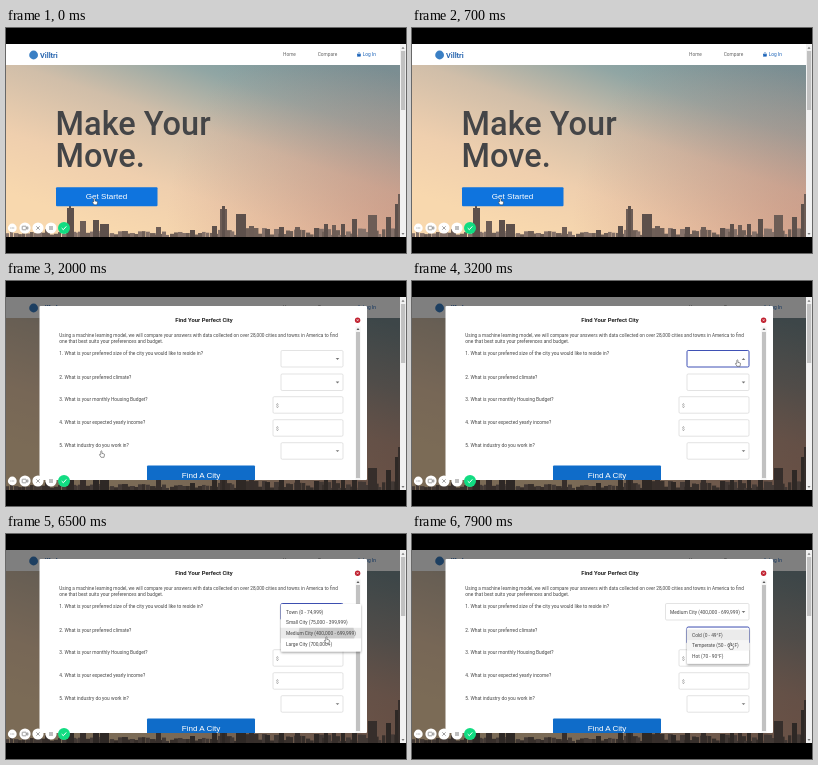
Write an HTML page that moves like this. It is 400 px wide and 225 px high and loops after 8000 ms.

```html
<!DOCTYPE html>
<html lang="en">
<head>
<meta charset="utf-8">
<title>Find Your Perfect City</title>
<style>
  html, body { margin: 0; width: 100%; height: 100%; overflow: hidden; background: #000; }
  svg { display: block; width: 100%; height: 100%; }
  text { font-family: Roboto, "Open Sans", sans-serif; font-size: 4.85px; fill: #444; white-space: pre; }
  .nav { font-size: 4.8px; fill: #666; }
  .hero { font-size: 32.5px; font-weight: 500; fill: #444547; }
  .btn { font-family: "Liberation Sans", Arial, sans-serif; font-size: 8.1px; fill: #fff; text-anchor: middle; }
  .title { font-size: 5.85px; font-weight: 700; fill: #222; text-anchor: middle; }
  .lead { font-size: 4.73px; }
  .dollar { fill: #777; }
  .field { fill: #fff; stroke: #d0d0d0; stroke-width: .6; }
  .field.hover { stroke: #444; }
  .field.focus { stroke: #3f51b5; stroke-width: 1; }
  .menu > .paper { fill: #fff; filter: url(#shadow); }
</style>
</head>
<body>
<svg viewBox="0 0 400 225" preserveAspectRatio="none">
  <defs>
    <linearGradient id="sky" gradientUnits="userSpaceOnUse" x1="260" y1="1" x2="183" y2="227">
      <stop offset="0" stop-color="#6a919a"/>
      <stop offset=".25" stop-color="#91a6a4"/>
      <stop offset=".48" stop-color="#d0bea9"/>
      <stop offset=".76" stop-color="#efcfae"/>
      <stop offset="1" stop-color="#f8d8ae"/>
    </linearGradient>
    <radialGradient id="dusk" gradientUnits="userSpaceOnUse" cx="400" cy="200" r="240">
      <stop offset="0" stop-color="#c4806f" stop-opacity=".55"/>
      <stop offset="1" stop-color="#c4806f" stop-opacity="0"/>
    </radialGradient>
    <filter id="shadow" x="-20%" y="-20%" width="140%" height="150%">
      <feDropShadow dx="0" dy="1.2" stdDeviation="1.3" flood-color="#000" flood-opacity=".4"/>
    </filter>
    <clipPath id="view"><rect y="16" width="400" height="193"/></clipPath>
    <clipPath id="card"><rect x="33.5" y="25" width="327.5" height="174" rx="1"/></clipPath>
    <clipPath id="rowClip"><rect x="275" y="93.8" width="80" height="10.6"/></clipPath>
  </defs>

  <rect width="400" height="225"/>
  <g clip-path="url(#view)">
    <rect y="37" width="400" height="172" fill="url(#sky)"/>
    <rect y="37" width="400" height="172" fill="url(#dusk)"/>
    <g id="city"></g>
    <rect y="16" width="400" height="21" fill="#fff"/>
    <circle cx="27.6" cy="27" r="4.4" fill="#3a7fc4"/>
    <text x="34" y="29.8" style="font-size:7.3px;font-weight:700;fill:#2866b0">Villtri</text>
    <text class="nav" x="277" y="28.3">Home</text>
    <text class="nav" x="311.7" y="28.3">Compare</text>
    <g stroke="#1a62b8" fill="none" stroke-width=".6">
      <path d="M352 26.4v-.8a1 1 0 0 1 2 0v.8"/>
      <rect x="351.6" y="26.4" width="2.8" height="1.8" fill="#1a62b8"/>
    </g>
    <text class="nav" x="356.7" y="28.3" style="fill:#1a62b8">Log In</text>
    <text class="hero" x="49.6" y="107">Make Your</text>
    <text class="hero" x="49.6" y="139">Move.</text>
    <rect x="50" y="159.3" width="101.5" height="19" rx="1" fill="#0f74de"/>
    <text class="btn" x="100.5" y="171.4">Get Started</text>

    <g id="dialog">
      <rect y="16" width="400" height="193" fill="#000" opacity=".5"/>
      <g clip-path="url(#card)">
        <rect x="33" y="25" width="329" height="174" fill="#fff"/>
        <text class="title" x="198" y="41.1">Find Your Perfect City</text>
        <circle cx="351.6" cy="39.2" r="2.7" fill="#c01f2e"/>
        <path d="M350.6 38.2l2 2m0-2l-2 2" stroke="#fff" stroke-width=".6"/>
        <rect x="349.5" y="45.5" width="5" height="154" fill="#f4f4f4"/>
        <rect x="350" y="51" width="4" height="146" fill="#c1c1c1"/>
        <path d="M350.5 49l1.5-2 1.5 2z" fill="#555"/>
        <text class="lead" x="53.3" y="56.2">Using a machine learning model, we will compare your answers with data collected on over 28,000 cities and towns in America to find</text>
        <text x="53.3" y="62.3">one that best suits your preferences and budget.</text>
        <g id="form"></g>
        <rect x="141" y="184.6" width="108" height="20" rx="1" fill="#0f6cc9"/>
        <text class="btn" x="195" y="197">Find A City</text>
      </g>
      <g id="menus"></g>
    </g>

    <rect x="394" y="16" width="6" height="193" fill="#f1f1f1"/>
    <rect x="395" y="23" width="4.2" height="59" fill="#c1c1c1"/>
    <path d="M395.5 20.8l1.5-2 1.5 2zM395.5 205l1.5 2 1.5-2z" fill="#777"/>

    <g id="tools">
      <circle cx="6.3" cy="200" r="4.4" fill="#fff"/>
      <circle cx="19" cy="200" r="5.6" fill="#fff"/>
      <circle cx="32" cy="200" r="5.6" fill="#fff"/>
      <circle cx="45" cy="200" r="5.6" fill="#fff"/>
      <circle cx="58" cy="200" r="6" fill="#12dc82"/>
      <g fill="none" stroke="#8a8a8a" stroke-width=".8">
        <path d="M4.4 200h3.8" stroke-dasharray=".9 .55"/>
        <rect x="16.2" y="198.2" width="4" height="3.6" rx=".5"/>
        <path d="M20.2 200l1.7-1.2v2.4zM30.3 198.3l3.4 3.4m0-3.4l-3.4 3.4"/>
        <path d="M44 198v4m2-4v4" stroke-width="1.1"/>
        <path d="M55.7 200.1l1.6 1.6 3-3.3" stroke="#fff" stroke-width="1"/>
      </g>
    </g>
    <path id="hand" d="M-1.2 .4V-2.7q.6-.9 1.2 0V-.6l2 .5q.7.2.5 1L2 3.3H-1L-2.5.9q-.1-.9.6-.6z"
      fill="#fff" stroke="#333" stroke-width=".5" stroke-linejoin="round"/>
  </g>
</svg>

<script>
const LOOP = 8000, STEP = 100, ROW = 10.6;
const NS = "http://www.w3.org/2000/svg";
const $ = id => document.getElementById(id);

function add(parent, tag, attrs, text) {
  const el = document.createElementNS(NS, tag);
  for (const k in attrs) el.setAttribute(k, attrs[k]);
  if (text) el.textContent = text;
  return parent.appendChild(el);
}

// Skyline: low seeded blocks, then the towers as [x, width, top].
let seed = 11;
const rand = () => (seed = seed * 16807 % 2147483647) / 2147483647;
const block = (x, w, top, fill) => add($("city"), "rect", { x, y: top, width: w, height: 210 - top, fill });
for (let x = 0; x < 400; x += 4) {
  block(x, 3 + rand() * 3, 207 - rand() * (x < 205 ? 4 : 7), rand() > .5 ? "#6f5f57" : "#85726a");
}
[[39, 5, 201], [61, 7, 180], [63, 2, 177], [74, 6, 193], [87, 6, 192], [94, 9, 196], [150, 5, 199],
 [184, 5, 202], [206, 5, 198], [214, 7, 181], [216, 3, 178], [230, 10, 186], [243, 5, 198], [259, 5, 201],
 [273, 5, 199], [289, 5, 199], [308, 5, 200], [318, 4, 196], [326, 4, 197], [335, 4, 196], [346, 5, 191],
 [362, 9, 187], [380, 5, 189], [389, 5, 176], [392, 2, 166]
].forEach(([x, w, top], i) => block(x, w, top, i % 3 ? "#5d504b" : "#6d5d56"));

// Form rows: [question, field left, field top, currency?]
const fields = [
  ["1. What is your preferred size of the city you would like to reside in?", 275, 69.5],
  ["2. What is your preferred climate?", 275, 93],
  ["3. What is your monthly Housing Budget?", 267, 115.7, true],
  ["4. What is your expected yearly income?", 267, 138.7, true],
  ["5. What industry do you work in?", 275, 161.7]
].map(([label, x, y, money]) => {
  add($("form"), "text", { x: 53.3, y: y + 4.7 }, label);
  const box = add($("form"), "rect", { class: "field", x, y, width: 337 - x, height: 16.5, rx: 1.2 });
  if (money) add($("form"), "text", { class: "dollar", x: 270, y: y + 10 }, "$");
  const arrow = money ? null : add($("form"), "path",
    { d: "M-1.8 -.9h3.6l-1.8 1.8z", fill: "#757575", transform: `translate(331.5 ${y + 8.5})` });
  return { box, arrow, x, y };
});
const choice = add($("form"), "text", { x: 258, y: 79.7 }, "Medium City (400,000 - 699,999)");

function makeMenu(top, first, width, items) {
  const g = add($("menus"), "g", { class: "menu" });
  add(g, "rect", { class: "paper", x: 275, y: top, width, height: first - top + items.length * ROW + 2.5, rx: 1 });
  const rows = items.map((_, i) => add(g, "rect", { x: 275, y: first + i * ROW, width, height: ROW }));
  const ripple = add(g, "circle", { cx: 320.5, cy: 101, r: 0, opacity: .14, "clip-path": "url(#rowClip)" });
  items.forEach((s, i) => add(g, "text", { x: 280, y: first + i * ROW + 7.1 }, s));
  return { g, rows, ripple, top, first };
}
const sizes = makeMenu(70, 72.6, 80,
  ["Town (0 - 74,999)", "Small City (75,000 - 399,999)", "Medium City (400,000 - 699,999)", "Large City (700,000+)"]);
const climates = makeMenu(94, 95.5, 62, ["Cold (0 - 49°F)", "Temperate (50 - 69°F)", "Hot (70 - 90°F)"]);

// Pointer path: [ms, x, y]
const path = [
  [0, 89, 173.5], [900, 89, 173.5], [1800, 96, 173], [2100, 96, 173], [2300, 300, 125], [2400, 300, 125],
  [2800, 326, 82], [4700, 326, 82], [4800, 326, 82], [5000, 329, 102], [5100, 329, 102], [5200, 336, 103],
  [5700, 336, 103], [5900, 321, 106], [6900, 321, 106], [7200, 320, 103], [7700, 320, 103],
  [7900, 319, 112], [LOOP, 319, 112]
];
const ramp = (t, from, to) => Math.min(1, Math.max(0, (t - from) / (to - from)));

function pointAt(t) {
  const i = path.findIndex(p => p[0] > t);
  const [a, b] = [path[i - 1], path[i]];
  const k = ramp(t, a[0], b[0]);
  return [a[1] + (b[1] - a[1]) * k, a[2] + (b[2] - a[2]) * k];
}

function showMenu(menu, open, fade, tipY, focused) {
  const { g, rows, top, first } = menu;
  const s = .75 + .25 * open;
  g.setAttribute("opacity", open * fade);
  g.setAttribute("transform", `translate(${306 * (1 - s)} ${top * (1 - s * s)}) scale(${s} ${s * s})`);
  const hover = Math.floor((tipY - first) / ROW);
  rows.forEach((r, i) => r.setAttribute("opacity", i === focused ? .08 : i === hover ? .04 : 0));
}

function draw(t) {
  const [x, y] = pointAt(t);
  const tipY = y - 3;
  const picked = t >= 6700;
  const focused = t >= 7400 ? 1 : t >= 3100 && t < 7200 ? 0 : -1;
  const menuUp = (t >= 3500 && t < 6900) || t >= 7400;
  $("hand").setAttribute("transform", `translate(${x} ${y})`);
  $("dialog").setAttribute("visibility", t < 800 ? "hidden" : "visible");

  fields.forEach((f, i) => {
    const over = !menuUp && x > f.x && x < 337 && tipY > f.y && tipY < f.y + 16.5;
    f.box.setAttribute("class", "field" + (i === focused ? " focus" : over ? " hover" : ""));
  });
  const left = picked ? 253.5 : 275;
  fields[0].box.setAttribute("x", left);
  fields[0].box.setAttribute("width", 337 - left);
  [t >= 3200 && !picked, t >= 7400].forEach((up, i) => {
    fields[i].arrow.setAttribute("transform", `translate(331.5 ${fields[i].y + 8.5}) rotate(${up ? 180 : 0})`);
  });
  choice.setAttribute("visibility", picked ? "inherit" : "hidden");

  showMenu(sizes, ramp(t, 3400, 3700), 1 - ramp(t, 6600, 6900), tipY, t < 6100 ? 0 : 2);
  showMenu(climates, ramp(t, 7300, 7600), 1, tipY, 0);
  sizes.ripple.setAttribute("r", t < 6300 ? 0 : t < 6500 ? 17.5 : 28);
}

function frame(now) {
  draw(Math.floor(now % LOOP / STEP) * STEP);
  requestAnimationFrame(frame);
}
draw(0);
requestAnimationFrame(frame);
</script>
</body>
</html>
```
